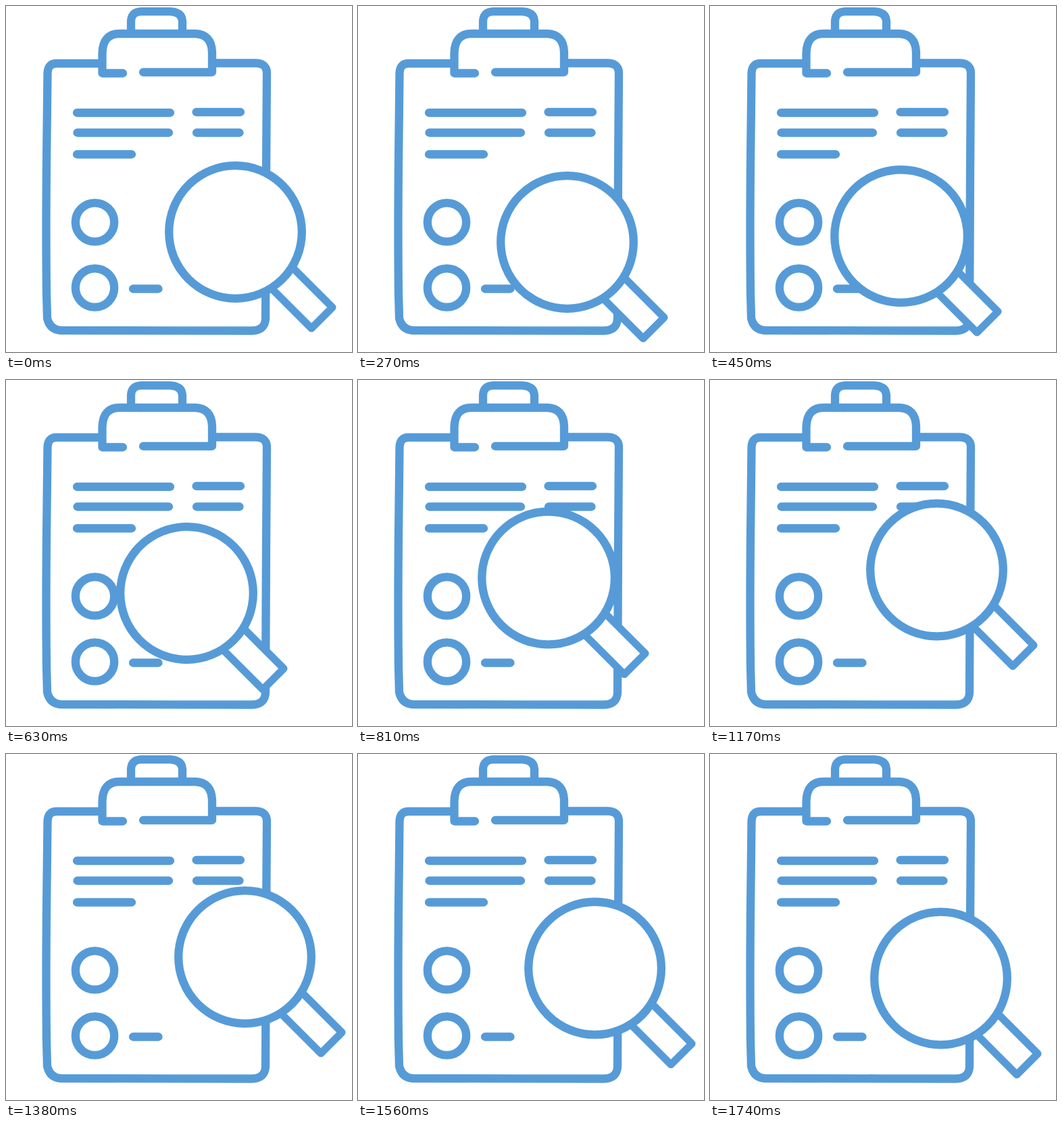
These frames come from a looping animation (512 by 512 pixels, 1.77 s). An HTML page:

```html
<!DOCTYPE html>
<html lang="en">
<head>
<meta charset="utf-8">
<title>Checklist search</title>
<style>
  html, body { margin: 0; width: 100%; height: 100%; overflow: hidden; background: #fff; }
  svg { display: block; width: 100vw; height: 100vh; }
  .ink { fill: none; stroke: #569bd7; stroke-width: 12.3; stroke-linecap: round; stroke-linejoin: round; }
  .solid { fill: #fff; }
</style>
</head>
<body>
<svg viewBox="0 0 512 512">
  <g class="ink">
    <!-- board -->
    <path stroke-linecap="butt" d="M142 85H75Q62 85 61.5 99L60 230Q59 340 60 425L61 462Q65 479 81 480L364 480.500Q383 480 384 463L385 250L386 98Q385 85 370 84.500H305"/>
    <!-- clip -->
    <path d="M173 99.500H142.500V70Q143 41 168 41H280Q304 42 305 68V98H203"/>
    <path stroke-linecap="butt" d="M185 41V22Q186 8.500 200 8.200H243Q260 9 261 22V41"/>
    <!-- text lines -->
    <path d="M105 158H243M281.500 157H347M105.500 187.500H241M282 187.500H345.500M105 219.500H186M188 418.500H225.500"/>
    <circle cx="131.500" cy="320" r="28.700"/>
    <circle cx="131.500" cy="417" r="28.700"/>
  </g>
  <g id="lens" class="ink solid">
    <path stroke-width="11" d="M80.500 48.500L143.500 111.500L112.500 142.500L49.500 79.500"/>
    <circle r="98.300"/>
  </g>
</svg>
<script>
const LOOP = 1770, STEP = 30, HOLD = 90, COUNT = 57;

// Lens centre along its closed path: [step, x, y]
const path = [
  [0, 339.5, 334.5], [7, 309.5, 349.5], [18, 268.3, 320.5], [19, 267.5, 315.5],
  [31, 309.5, 282], [36, 331.5, 280.6], [37, 335.5, 281], [44, 353.5, 300.5],
  [47, 353.4, 308.7], [54, 344.5, 327.5], [56, 341.5, 332]
];

// Node by index, wrapping round the loop
function node(i) {
  const n = path.length, lap = Math.floor(i / n);
  const [k, x, y] = path[i - lap * n];
  return [k + lap * COUNT, x, y];
}

// Slope at a node, weighted towards the nearer neighbour
function slope(i, axis) {
  const a = node(i - 1), b = node(i), c = node(i + 1);
  const before = b[0] - a[0], after = c[0] - b[0];
  return ((b[axis] - a[axis]) / before * after + (c[axis] - b[axis]) / after * before) / (before + after);
}

function position(k, axis) {
  let i = 0;
  while (node(i + 1)[0] <= k) i++;
  const a = node(i), b = node(i + 1), span = b[0] - a[0];
  const u = (k - a[0]) / span, v = 1 - u;
  return v * v * (1 + 2 * u) * a[axis] + u * u * (1 + 2 * v) * b[axis]
    + span * u * v * (v * slope(i, axis) - u * slope(i + 1, axis));
}

const lens = document.getElementById("lens");

function draw(time) {
  const t = time % LOOP;
  const k = t < HOLD ? 0 : Math.floor((t - HOLD) / STEP) + 1;
  lens.setAttribute("transform", `translate(${position(k, 1)} ${position(k, 2)})`);
}

const start = performance.now();
function tick() {
  draw(performance.now() - start);
  requestAnimationFrame(tick);
}
tick();
</script>
</body>
</html>
```
